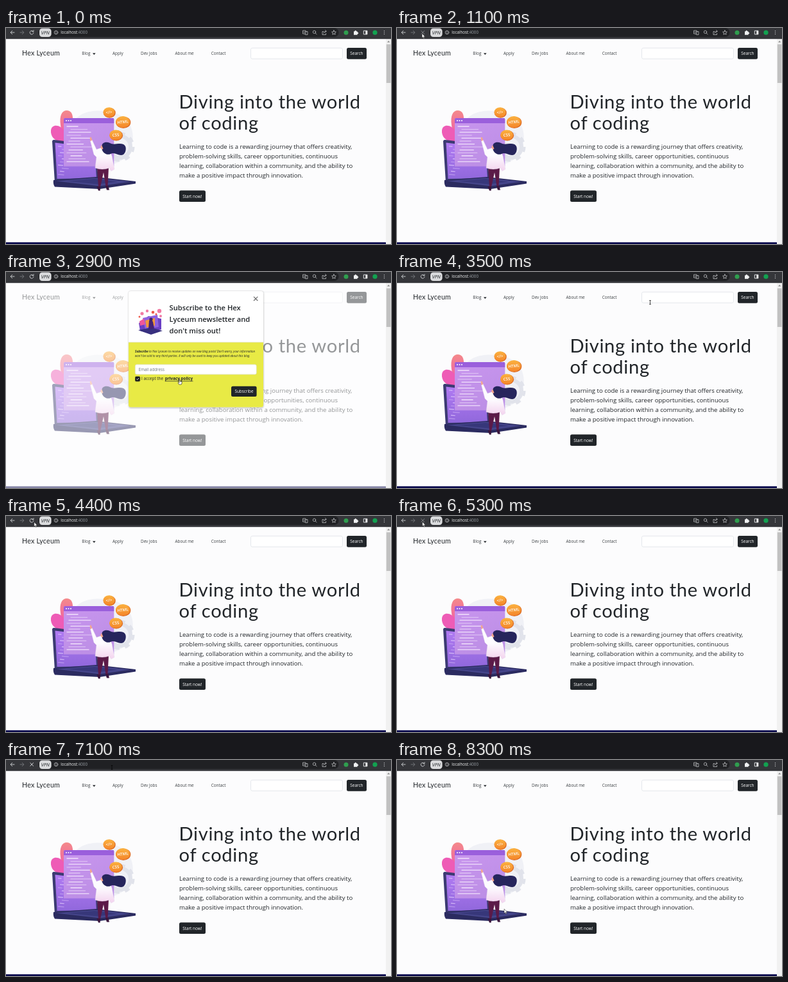
Recreate the animation shown at these times as an HTML page. Size 600x338 px, loop 8.4 s.

```html
<!DOCTYPE html>
<html lang="en">
<head>
<meta charset="utf-8">
<title>Landing page with newsletter pop-up</title>
<style>
  html, body { margin: 0; width: 100%; height: 100%; overflow: hidden; background: #fcfcfd; }
  svg { display: block; width: 100vw; height: 100vh; }
  text { font-family: "Open Sans", "Noto Sans", sans-serif; fill: #212529; white-space: pre; }
  .brand { font-family: Lato, sans-serif; }
  .title { font-size: 29.2px; letter-spacing: .65px; }
  .nav { font-size: 6.4px; fill: #3c4044; }
  .btn { font-size: 6.4px; fill: #fff; }
  .lead { font-size: 9.58px; }
  .tag { font-weight: 600; fill: #fff; text-anchor: middle; }
  .icon { fill: none; stroke: #d4d6d9; stroke-width: .9; stroke-linecap: round; stroke-linejoin: round; }
</style>
</head>
<body>
<svg viewBox="0 0 600 338" preserveAspectRatio="none">
  <defs>
    <linearGradient id="win" x1="0" y1="0" x2=".4" y2="1">
      <stop offset="0" stop-color="#c895ee"/><stop offset="1" stop-color="#bd8fe6"/>
    </linearGradient>
    <linearGradient id="scr" x1="0" y1="0" x2="0" y2="1">
      <stop offset="0" stop-color="#b07af2"/><stop offset="1" stop-color="#9168dc"/>
    </linearGradient>
    <linearGradient id="leaf" x1="0" y1="0" x2="0" y2="1">
      <stop offset="0" stop-color="#f4898a"/><stop offset="1" stop-color="#ee5ca8"/>
    </linearGradient>
    <linearGradient id="gold" x1="0" y1="0" x2="0" y2="1">
      <stop offset="0" stop-color="#fbb23f"/><stop offset="1" stop-color="#f4862b"/>
    </linearGradient>
    <linearGradient id="shirt" x1="0" y1="0" x2="0" y2="1">
      <stop offset=".5" stop-color="#fdfbff"/><stop offset="1" stop-color="#f3d3ee"/>
    </linearGradient>
    <filter id="soft" x="-10%" y="-10%" width="120%" height="120%"><feGaussianBlur stdDeviation="1.2"/></filter>
  </defs>

  <!-- page -->
  <rect width="600" height="338" fill="#fcfcfd"/>
  <text class="brand" x="25" y="43.200" font-size="10.7" letter-spacing=".22">Hex Lyceum</text>
  <g>
    <text class="nav" x="118.300" y="42.300">Blog</text>
    <path d="M135 39.300h4.600l-2.300 2.600z" fill="#212529"/>
    <text class="nav" x="166" y="42.300">Apply</text>
    <text class="nav" x="210" y="42.300">Dev Jobs</text>
    <text class="nav" x="263.500" y="42.300">About me</text>
    <text class="nav" x="319.700" y="42.300">Contact</text>
  </g>
  <rect x="381.500" y="31.300" width="143" height="17" rx="2.500" fill="#fff" stroke="#e3e6ea" stroke-width=".9"/>
  <rect x="531" y="31" width="31" height="17.800" rx="2.500" fill="#212529"/>
  <text class="btn" x="536.300" y="42.300">Search</text>
  <text class="brand title" x="269.500" y="126.300">Diving into the world</text>
  <text class="brand title" x="269.500" y="159.300">of coding</text>
  <text class="lead" x="270" y="188.500">Learning to code is a rewarding journey that offers creativity,</text>
  <text class="lead" x="270" y="203.700">problem-solving skills, career opportunities, continuous</text>
  <text class="lead" x="270" y="218.900">learning, collaboration within a community, and the ability to</text>
  <text class="lead" x="270" y="234.100">make a positive impact through innovation.</text>
  <rect x="270" y="254.300" width="41" height="17.700" rx="2.500" fill="#212529"/>
  <text class="btn" x="275.200" y="265.700">Start now!</text>
  <rect y="335.300" width="592" height="3" fill="#06064c"/>

  <!-- illustration -->
  <g>
    <path d="M104 150C112 130 140 126 166 132C192 138 202 160 196 184C191 208 164 220 136 214C108 208 95 172 104 150Z" fill="#f0f1f6"/>
    <circle cx="177" cy="186" r="17" fill="none" stroke="#e1e3eb" stroke-width="6"/>
    <circle cx="177" cy="186" r="21.500" fill="none" stroke="#e1e3eb" stroke-width="4" stroke-dasharray="8 8.890"/>
    <path d="M85 152C83 137 87 129 95 129C103 129 106 138 103 152L100 172H88Z" fill="url(#leaf)"/>
    <path d="M92 178C78 180 69 171 70 160C71 152 79 151 85 155C92 160 95 169 92 178Z" fill="#ee5cb6"/>
    <path d="M72 177.500Q72 174.500 75 175L140 183L144 240L76 242Z" fill="#3b3a72"/>
    <path d="M76.500 179.500L138 187L141 235L79.500 236Z" fill="url(#scr)"/>
    <g id="screenLines" stroke="#dcc2fa" stroke-width="1.200"></g>
    <path d="M74 238L140 233L202 240V243.500L146 252L76 248.500Q73 244 74 238Z" fill="#2b2b60"/>
    <path d="M78 239.500L138 234.500L194 240.500L146 247.500Z" fill="#45458a"/>
    <path d="M94 239.500L138 236L174 240.500L143 244.500Z" fill="#37377a"/>
    <path d="M92 141H166.500Q168.300 141 168.300 143V216.500H90V143Q90 141 92 141Z" fill="url(#win)"/>
    <path d="M92 141H166.500Q168.300 141 168.300 143V149H90V143Q90 141 92 141Z" fill="#9a5fdc"/>
    <g fill="#fff"><circle cx="94" cy="145" r="1"/><circle cx="97.500" cy="145" r="1"/><circle cx="101" cy="145" r="1"/></g>
    <g id="codeLines" stroke="#f6eafd" stroke-width="1.300" stroke-linecap="round"></g>
    <g id="bubbles"></g>
    <!-- woman -->
    <path d="M142 218H160L158.500 248H155.500L152 226L147 249H144Z" fill="#5b1a48"/>
    <path d="M141.500 248h5.500l-.3 6.500h-2.700zM155 247h4.500l1.500 6.500h-4z" fill="#3a163c"/>
    <path d="M150 187L141 190L134 175L131.500 177L137 198L141 202L139 219Q150 223 161 219L164 224L169 221L165 200Q161 188 150 187Z" fill="url(#shirt)" stroke="#e4dcee" stroke-width=".4"/>
    <path d="M131.500 177L130.700 171.500L132.500 170.500L134.300 175.500Z" fill="#f4a68d"/>
    <path d="M149 186C149 179 156 177 162 180C168 184 176 179 183 182C189 185 187 195 183 198C176 202 170 193 163 197C157 200 149 195 149 186Z" fill="#26255c"/>
    <path d="M149 183l-2 4 2.500 3 2-1z" fill="#f4a68d"/>
  </g>

  <rect id="shade" y="17" width="592" height="321" fill="#fff"/>

  <!-- newsletter -->
  <g id="modal">
    <rect x="191" y="30" width="210.500" height="183" rx="4" fill="#000" opacity=".25" filter="url(#soft)"/>
    <rect x="191" y="30" width="210" height="181.500" rx="3.500" fill="#fff"/>
    <path d="M191 110H401V208Q401 211.500 397.500 211.500H194.500Q191 211.500 191 208Z" fill="#e8ea45"/>
    <path d="M191 110H401" stroke="#d9dbc0" stroke-width=".6"/>
    <path d="M386 38.700l6.300 6.300m0-6.300l-6.300 6.300" stroke="#666" stroke-width="1.100"/>
    <g>
      <path d="M207 80L222 69L242 73V90L222 95L209 92Z" fill="#6a3fc4"/>
      <path d="M213 72L236 67L238 86L217 90Z" fill="#8f62e0"/>
      <path d="M217 76L232 72V84L219 87Z" fill="#f3973a"/>
      <path d="M206 91L226 87L244 92L226 98Z" fill="#38307f"/>
      <path d="M223 76q4-3 6 2l2 10-9 2z" fill="#442375"/>
      <circle cx="226" cy="74" r="2.600" fill="#3a2466"/>
      <path d="M208 77l7-4 2 9-8 2z" fill="#f0569b"/>
      <g fill="#f17ba4"><circle cx="212" cy="65" r="2.600"/><circle cx="220" cy="61" r="2.200"/><circle cx="239" cy="61" r="3.200"/><circle cx="241" cy="69" r="2"/></g>
      <g fill="#ef5a4b"><circle cx="229" cy="63" r="2.300"/><circle cx="234" cy="66" r="1.500"/><circle cx="208" cy="70" r="1.500"/></g>
    </g>
    <g font-size="11.2" font-weight="600">
      <text x="254.500" y="60.300">Subscribe to the Hex</text>
      <text x="254.500" y="77.900">Lyceum newsletter and</text>
      <text x="254.500" y="95.500">don't miss out!</text>
    </g>
    <g font-size="4.55" font-style="italic">
      <text x="201" y="125.700"><tspan font-weight="700">Subscribe</tspan> to Hex Lyceum to receive updates on new blog posts! Don't worry, your information</text>
      <text x="201" y="132.900">won't be sold to any third parties. It will only be used to keep you updated about this blog.</text>
    </g>
    <rect x="201.300" y="144.800" width="189" height="15.400" rx="2.300" fill="#fff" stroke="#d8dac8" stroke-width=".6"/>
    <text x="206.700" y="154.800" font-size="6.2" style="fill:#6c757d">Email address</text>
    <rect x="201.800" y="164" width="6.600" height="6.600" rx="1.600" fill="#fff" stroke="#d0d2c0" stroke-width=".5"/>
    <g id="check">
      <rect x="201" y="163.200" width="8.200" height="8.200" rx="2" fill="#4c4d2b"/>
      <rect x="201.900" y="164.100" width="6.400" height="6.400" rx="1.400" fill="#16181b"/>
      <path d="M203.400 167.400l1.300 1.300 2.300-2.700" fill="none" stroke="#fff" stroke-width=".9"/>
    </g>
    <text x="211" y="169.400" font-size="6.35">I accept the</text>
    <text x="247.700" y="169.400" font-size="6.35" font-weight="700">privacy policy</text>
    <path id="under" d="M247.700 170.800h43.800" stroke="#212529" stroke-width=".7"/>
    <rect x="351" y="178.800" width="39.600" height="16.300" rx="2.500" fill="#212529"/>
    <text class="btn" x="356.400" y="189.300">Subscribe</text>
  </g>

  <!-- scrollbar -->
  <rect x="592" y="17" width="8" height="321" fill="#f1f1f1"/>
  <path d="M594 22.500h4.400l-2.200-2.700z" fill="#909090"/>
  <rect x="592.800" y="25.500" width="6.600" height="60.500" fill="#c1c1c1"/>

  <!-- browser bar -->
  <rect width="600" height="17.200" fill="#35363a"/>
  <rect x="50.500" y="0" width="468" height="14" rx="7" fill="#202124"/>
  <path class="icon" d="M13 7H7.300m2.500-2.700L7.100 7l2.700 2.700"/>
  <path class="icon" d="M22 7h5.700m-2.500-2.700L27.900 7l-2.700 2.700" style="stroke:#77797d"/>
  <path class="icon" id="reload" d="M42.300 5.200A2.900 2.900 0 1 0 43 7.500M43 3.700V5.700H40.800"/>
  <path class="icon" id="stop" d="M37.800 4.500l4.800 4.800m0-4.800l-4.800 4.800"/>
  <rect x="52" y=".4" width="18.600" height="13.600" rx="4.500" fill="#dadbdd"/>
  <text x="61.300" y="9.800" font-size="7.2" font-style="italic" text-anchor="middle">VPN</text>
  <g class="icon" style="stroke-width:.7">
    <circle cx="78" cy="7" r="2.800"/><path d="M78 6.700v1.800M78 5.300v.1"/>
    <path d="M463 4h4v5h-4zM467 5.500h3v5h-3.500l-1-1.500M464.200 6.500h1.600"/>
    <circle cx="480.500" cy="6.300" r="2.200"/><path d="M482.200 8l2 2"/>
    <path d="M495 5.500h-2v5h5.500v-2M495 8.200q.5-3 4-3.200m-1.500-1.600L499.200 5l-1.700 1.700"/>
    <path d="M511 3.700l1 2.200 2.400.3-1.800 1.600.5 2.400-2.100-1.200-2.100 1.200.5-2.400-1.800-1.600 2.400-.3z"/>
  </g>
  <text x="85.200" y="9.300" font-size="6.2" style="fill:#f1f3f4">localhost<tspan fill="#9aa0a6">:4000</tspan></text>
  <circle cx="530" cy="7.200" r="3.500" fill="#2f9e4f"/>
  <path d="M542 5.300h1.600a1.200 1.200 0 1 1 2.300 0h1.700v1.500a1.200 1.200 0 1 1 0 2.300v1.700h-5.600z" fill="#f1f3f4"/>
  <path d="M557.300 4.300h5.600v5.600h-5.600z" fill="none" stroke="#f1f3f4" stroke-width=".9"/>
  <path d="M560.300 4.300h2.600v5.600h-2.600z" fill="#f1f3f4"/>
  <circle cx="575" cy="7.200" r="3.600" fill="#12a150"/>
  <g fill="#d4d6d9"><circle cx="589.500" cy="4.600" r=".7"/><circle cx="589.500" cy="7.100" r=".7"/><circle cx="589.500" cy="9.600" r=".7"/></g>

  <!-- pointer -->
  <g id="pointer">
    <path id="arrow" d="M0 0V7L1.600 5.600L2.700 8L3.800 7.500L2.700 5.200H4.800Z" fill="#fff" stroke="#222" stroke-width=".5"/>
    <path id="hand" d="M-.6 0Q0-.6.6 0V3L3.600 3.700V6L2.700 8H-.8L-2.600 5.200L-1.900 4.500L-.6 5.400Z" fill="#fff" stroke="#111" stroke-width=".6"/>
    <path id="beam" d="M-1.300-3H1.300M0-3V3M-1.300 3H1.300" fill="none" stroke="#000" stroke-width=".7"/>
  </g>
</svg>
<script>
const LOOP = 8400;
const $ = id => document.getElementById(id);
const clamp = v => Math.max(0, Math.min(1, v));
const ramp = (t, from, span) => clamp((t - from) / span);
const within = (t, a, b) => t >= a && t < b;
const show = (id, on) => $(id).setAttribute('visibility', on ? 'inherit' : 'hidden');

// Code rows inside the window and the laptop screen
function rows(id, count, x, y, step, slope, len) {
  let out = '';
  for (let i = 0; i < count; i++) {
    const a = x + (i * 5 % 3) * 3, b = a + len * (0.45 + (i * 7 % 5) / 9), top = y + i * step;
    out += `<path d="M${a} ${top}L${b} ${top + (b - a) * slope}" opacity="${i % 2 ? 0.5 : 0.9}"/>`;
  }
  $(id).innerHTML = out;
}
rows('codeLines', 13, 95, 154, 4.6, 0, 38);
rows('screenLines', 10, 81, 185, 4.9, 0.08, 12);

$('bubbles').innerHTML = [[160.5, 132, 9.5, 8, '</>', 6.5], [182, 147, 11.5, 9.3, 'HTML', 6.2], [171, 167.5, 10.3, 8.3, 'CSS', 6.2]]
  .map(([x, y, rx, ry, label, size]) =>
    `<g transform="translate(${x} ${y})">` +
    `<ellipse cx=".8" cy=".7" rx="${rx}" ry="${ry}" fill="#dd6a22"/>` +
    `<ellipse rx="${rx - 0.4}" ry="${ry - 0.3}" fill="url(#gold)"/>` +
    `<text class="tag" y="2.2" font-size="${size}" transform="rotate(-7)">${label.replace('<', '&lt;')}</text></g>`).join('');

// Pointer stops: time, x, y
const stops = [
  [100, 150, 245], [700, 39, 8.5], [1900, 39, 8.5], [2400, 204, 167], [2550, 204, 167],
  [2880, 270.5, 168], [2960, 270.5, 168], [3200, 388.5, 41], [3300, 388.5, 41], [3480, 394.5, 47.5],
  [3700, 394.5, 47.5], [4450, 39.5, 9], [6600, 39.5, 9], [7080, 165, 11.5], [7300, 165, 11.5], [8280, 167, 233]
];

function pointerAt(t) {
  let i = 0;
  while (i < stops.length - 2 && t >= stops[i + 1][0]) i++;
  const [t0, x0, y0] = stops[i], [t1, x1, y1] = stops[i + 1];
  const k = ramp(t, t0, t1 - t0), e = k * k * (3 - 2 * k);
  return [x0 + (x1 - x0) * e, y0 + (y1 - y0) * e];
}

const OPEN = 1200, CLOSE = 3220;

function draw(t) {
  const slideIn = 1 - (1 - ramp(t, OPEN, 300)) ** 2;
  const slideOut = ramp(t, CLOSE, 200) ** 2;
  const fade = ramp(t, OPEN, 150) * (1 - ramp(t, CLOSE, 150));
  $('modal').setAttribute('opacity', fade);
  $('modal').setAttribute('transform', `translate(0 ${-17 * (1 - slideIn + slideOut)})`);
  $('shade').setAttribute('opacity', 0.52 * ramp(t, OPEN, 150) * (1 - ramp(t, CLOSE + 100, 150)));
  show('check', t >= 2450);

  const [x, y] = pointerAt(t);
  const loading = within(t, 750, 2000) || within(t, 4700, 5900) || within(t, 6300, 7600);
  show('reload', !loading);
  show('stop', loading);
  $('stop').style.stroke = x < 45 ? '#8a8c90' : '#e8eaed';

  const hand = within(t, 2700, 3000);
  const beam = within(t, 3380, 3780) || within(t, 6750, 7330);
  show('pointer', t >= 100);
  show('hand', hand);
  show('under', hand);
  show('beam', beam);
  show('arrow', !hand && !beam);
  $('pointer').setAttribute('transform', `translate(${x} ${y})`);
}

function tick() {
  draw(performance.now() % LOOP);
  requestAnimationFrame(tick);
}
tick();
</script>
</body>
</html>
```
